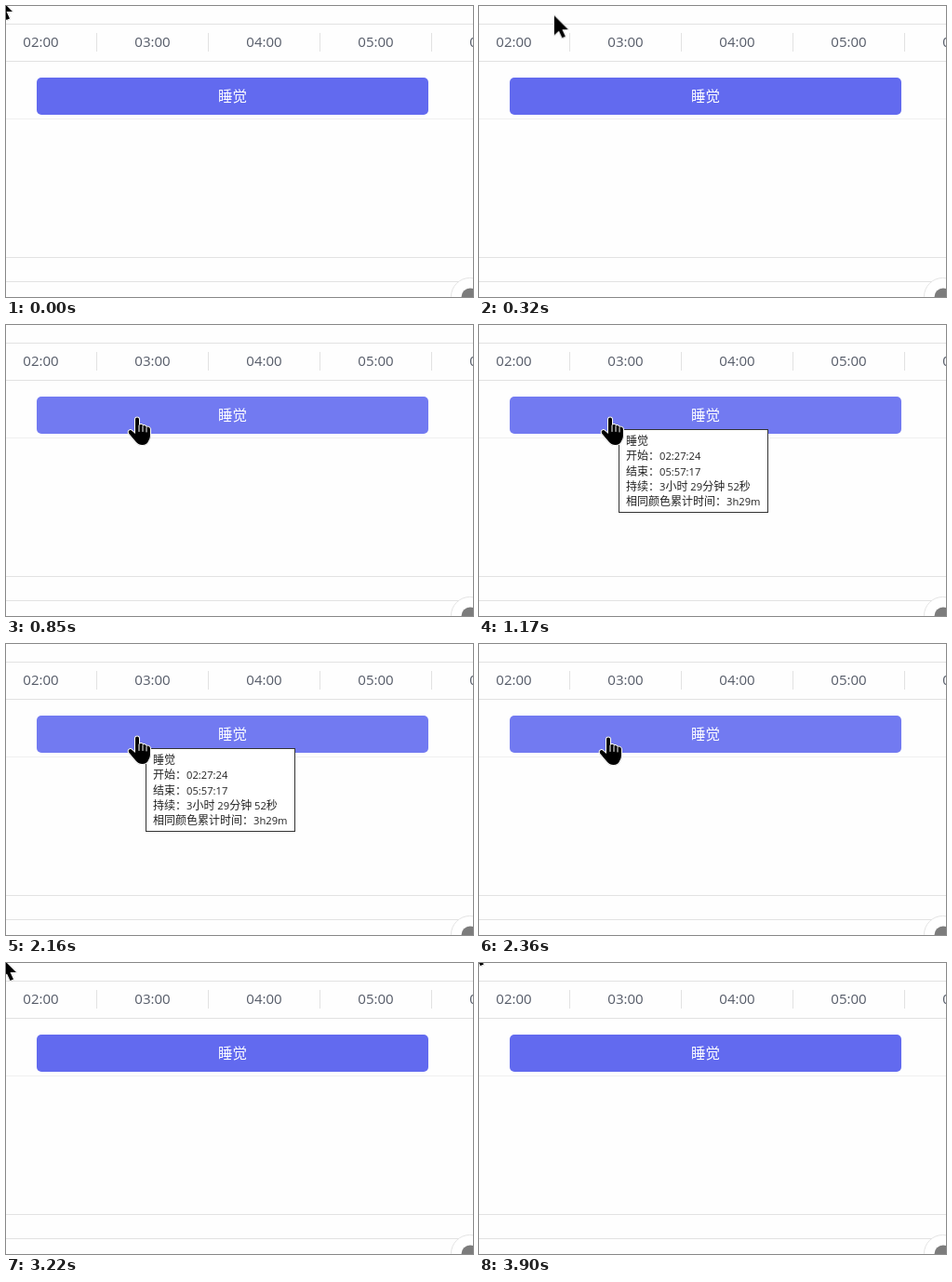
These frames come from a looping animation (502 by 313 pixels, 4400 ms). An HTML page:

```html
<!DOCTYPE html>
<html lang="zh-CN">
<head>
<meta charset="utf-8">
<title>Timeline tooltip</title>
<style>
  html, body { margin: 0; width: 100%; height: 100%; overflow: hidden; background: #fefefe; }
  svg { display: block; width: 502px; height: 313px; }

  text { font-family: "Noto Sans CJK SC", "Noto Sans CJK", "Noto Sans", sans-serif; }
  .hours text { font: 15px "Open Sans", "Noto Sans", sans-serif; fill: #555b68; text-anchor: middle; }
  .label { font-size: 15.5px; fill: #fff; text-anchor: middle; }
  .tip text { font-size: 12px; fill: #222; }
  .tip tspan { font: 11.2px "Open Sans", "Noto Sans", sans-serif; }

  .rules { fill: #e2e2e2; }
  .cursor { fill: #000; stroke: #fff; stroke-linejoin: round; filter: drop-shadow(.5px .5px .6px #0006); }
  .outline { stroke-width: 2; paint-order: stroke; }
  .gaps { fill: none; stroke-width: 1; stroke-linecap: round; }

  .bar, .tip, .hand, .arrow { animation: 4400ms step-end infinite; }
  .bar { fill: #626aef; animation-name: hover; }
  .tip { visibility: hidden; animation-name: tip; }
  .hand { animation-name: hand; }
  .arrow { animation-name: arrow; }

  @keyframes hover {
    0% { fill: #626aef; }
    15.67% { fill: #626aef; animation-timing-function: linear; }
    18.4% { fill: #727af1; }
    56.36% { fill: #727af1; animation-timing-function: linear; }
    58.6%, 100% { fill: #626aef; }
  }

  @keyframes tip {
    0%, 53.63%, 100% { visibility: hidden; }
    26.59% { visibility: visible; }
  }

  @keyframes hand {
    0%, 56.36%, 100% { transform: translate(-60px, -60px); }
    14.77% { transform: translate(128px, 78.5px); animation-timing-function: steps(5); }
    19.31% { transform: translate(130px, 98px); }
    49.09% { transform: translate(130px, 98px); animation-timing-function: steps(5); }
    53.63% { transform: translate(128px, 99px); }
    55.45% { transform: translate(117px, 108px); }
  }

  @keyframes arrow {
    0% { transform: translate(-8px, -9px); }
    1.81% { transform: translate(2px, -6px); animation-timing-function: steps(7); }
    8.18% { transform: translate(94px, 13px); }
    9.09%, 57.27%, 75% { transform: translate(-60px, -60px); }
    56.36% { transform: translate(95px, 126px); }
    73.18% { transform: translate(-4px, -5px); }
    74.09% { transform: translate(10px, -8px); }
    79.54% { transform: translate(4px, -14px); animation-timing-function: steps(5); }
    84.09% { transform: translate(11px, -11px); animation-timing-function: steps(5); }
    88.63%, 100% { transform: translate(-7px, -21px); }
  }
</style>
</head>
<body>
<svg viewBox="0 0 502 313">
  <g class="rules">
    <rect y="19" width="502" height="1"/>
    <rect y="59" width="502" height="1"/>
    <rect y="121" width="502" height="1" fill="#f0f0f0"/>
    <rect y="270" width="502" height="1"/>
    <rect y="296" width="502" height="1"/>
    <rect x="97" y="29" width="1" height="20"/>
    <rect x="217" y="29" width="1" height="20"/>
    <rect x="337" y="29" width="1" height="20"/>
    <rect x="457" y="29" width="1" height="20"/>
  </g>

  <g class="hours">
    <text x="37.5" y="44">02:00</text>
    <text x="157.5" y="44">03:00</text>
    <text x="277.5" y="44">04:00</text>
    <text x="397.5" y="44">05:00</text>
    <text x="517.5" y="44">06:00</text>
  </g>

  <rect class="bar" x="33" y="77" width="421" height="40" rx="5"/>
  <text class="label" x="243.5" y="102.5">睡觉</text>

  <circle cx="498.5" cy="312.5" r="20" fill="#fff" stroke="#e4e4e4"/>
  <circle cx="499" cy="313" r="9.5" fill="#7c7c7c"/>

  <g class="tip">
    <rect x="150.5" y="112.5" width="160" height="89" fill="#fff" stroke="#333"/>
    <text x="158" y="129">睡觉</text>
    <text x="158" y="145">开始：<tspan>02:27:24</tspan></text>
    <text x="158" y="162">结束：<tspan>05:57:17</tspan></text>
    <text x="158" y="178">持续：<tspan>3</tspan>小时<tspan> 29</tspan>分钟<tspan> 52</tspan>秒</text>
    <text x="158" y="194">相同颜色累计时间：<tspan>3h29m</tspan></text>
  </g>

  <g class="hand">
    <g class="cursor">
      <path class="outline" d="M9 19V3.5Q9 1.5 11 1.5T13 3.5V10Q14 8.8 15.5 9T17 10.8Q18 9.8 19.3 10.2T21 12Q22 11.2 23.3 11.8T25 14V21Q25 24 23 27Q21.5 31 16.5 31Q12.5 31 10 28Q6 23.5 2 18.5Q1 16.5 2.5 15.5T5.5 16Z"/>
      <path class="gaps" d="M13 10V16.5M17 11V16.5M21 12.5V17"/>
    </g>
  </g>

  <g class="arrow">
    <g class="cursor">
      <path class="outline" d="M0 0V21L5 16.5L8.5 24L12 22.5L8.5 15H15Z"/>
    </g>
  </g>
</svg>
</body>
</html>
```
